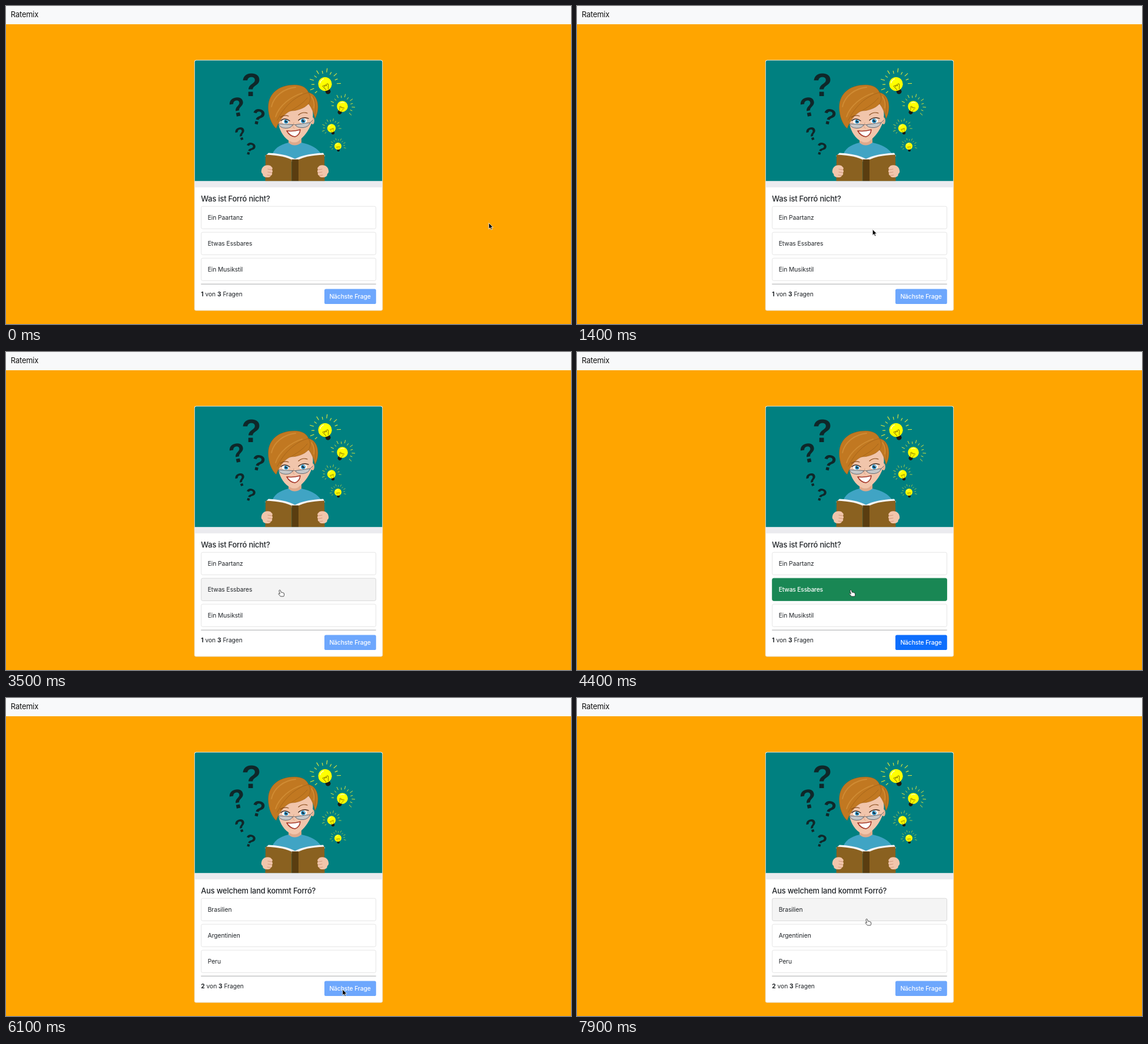
An HTML page that plays this animation: 960 by 540 pixels, repeating every 8 s.

```html
<!DOCTYPE html>
<html lang="de">
<head>
<meta charset="utf-8">
<title>Ratemix</title>
<style>
  html, body { margin: 0; width: 100%; height: 100%; overflow: hidden; background: #ffa500; }
  svg.stage { display: block; width: 960px; height: 540px; }
  text { font-family: Inter, Roboto, "Liberation Sans", sans-serif; font-size: 10.34px; letter-spacing: -.008em; fill: #212529; white-space: pre; }
  .large { font-size: 12.9px; letter-spacing: -.016em; }
  .brand { fill: #111; }
  .title { font-weight: 500; }
  .bold { font-weight: 700; }
  .mark { font: bold 55px "Liberation Sans", Arial, sans-serif; letter-spacing: 0; fill: #0f2729; text-anchor: middle; }
  .option rect { fill: #fff; stroke: #dfdfdf; stroke-width: .8; }
  .option.hover rect { fill: #f4f4f4; stroke: #d2d2d2; }
  .option.right rect { fill: #198754; stroke: #198754; }
  .option.right text { fill: #fff; font-weight: 500; letter-spacing: -.017em; }
  .button text { fill: #fff; font-weight: 450; letter-spacing: -.011em; }
  .line { fill: none; stroke-linecap: round; stroke-linejoin: round; }
</style>
</head>
<body>
<svg class="stage" viewBox="0 0 960 540">
  <defs>
    <g id="bulb">
      <path d="M-4 10L4 10L4.300 15Q3 18 0 18Q-3 18-4.300 15Z" fill="#1b1b14"/>
      <circle r="11.600" fill="#ff0"/>
      <path class="line" d="M-7-5Q-4-9 1-9" stroke="#ffffa8" stroke-width="1.600"/>
      <path class="line" d="M-2 10L-5 2Q-2 0-2 4Q0-1 1 4Q3-1 5 2L2 10" stroke="#7d6a00" stroke-width=".9"/>
      <g class="rays" stroke="#e6e83a" stroke-width="1.100"></g>
    </g>
    <clipPath id="top"><path d="M320.800 297.400V95Q320.800 92.500 323.200 92.500H636.800Q639.200 92.500 639.200 95V297.400Z"/></clipPath>
  </defs>

  <rect width="960" height="540" fill="#ffa500"/>
  <rect width="960" height="31" fill="#f8f9fa"/>
  <text class="large brand" x="8" y="19.300">Ratemix</text>

  <rect x="320.300" y="92" width="319.400" height="425" rx="2.600" fill="#fff" stroke="#e6e3dd" stroke-width=".9"/>

  <g clip-path="url(#top)">
    <rect x="320" y="92" width="320" height="206" fill="#008080"/>
    <g id="marks"></g>
    <g id="bulbs"></g>

    <!-- reader -->
    <ellipse cx="521" cy="195" rx="3" ry="6" fill="#e5b396"/>
    <path d="M480 220V239Q490 247 502 239V220Z" fill="#dfa98b"/>
    <path d="M451 258C453 243 464 236 480 232Q490 241 502 232C520 236 534 243 538 258L490 264Z" fill="#40a4c4"/>
    <path d="M462 182C461 200 465 212 473 222C480 230 489 234 496 230C507 222 516 210 520 196C523 185 522 165 512 158C495 150 468 158 462 182Z" fill="#f1c5ab"/>
    <path d="M459 208C450 200 444 182 446 166C449 146 466 134 490 134C503 134 511 139 514 147C525 149 530 160 530 171C530 179 528 186 525 191C523 181 519 172 514 166C509 172 497 178 484 178C475 181 465 192 459 208Z" fill="#c17821" stroke="#9a5d18" stroke-width=".5"/>
    <g class="line" stroke="#a4651a" stroke-width=".9">
      <path d="M514 147C503 149 478 160 461 194"/>
      <path d="M514 166C518 160 518 153 514 147"/>
      <path d="M512 156C503 167 493 172 484 178"/>
      <path d="M522 153Q528 166 525 183"/>
    </g>
    <g class="line" stroke="#d08c34" stroke-width="1.800">
      <path d="M492 138C472 140 455 153 451 171"/>
      <path d="M503 148C484 154 464 169 458 188"/>
      <path d="M519 154Q525 162 523 173"/>
    </g>
    <g fill="#fff">
      <ellipse cx="475" cy="196.500" rx="6" ry="4"/>
      <ellipse cx="505" cy="195" rx="6.500" ry="4.500"/>
    </g>
    <g fill="#2685b5"><circle cx="476" cy="196" r="3.500"/><circle cx="505" cy="195" r="3.800"/></g>
    <g fill="#0d1d2b"><circle cx="476" cy="196" r="1.600"/><circle cx="505" cy="195" r="1.700"/></g>
    <g fill="#fff"><circle cx="477.500" cy="194.500" r=".9"/><circle cx="506.500" cy="193.500" r="1"/></g>
    <g class="line" stroke="#2e1c14" stroke-width="1.300">
      <path d="M467 194.500Q474 188.500 482 195"/>
      <path d="M497 194Q505 187 514 191"/>
    </g>
    <g class="line" stroke="#8a4d1c" stroke-width="1.200">
      <path d="M466 189Q473 184 480 187"/>
      <path d="M497 185Q504 179 512 182"/>
    </g>
    <path class="line" d="M489 198Q485 206 490 207.500" stroke="#d39c81" stroke-width=".9"/>
    <g fill="#b9c8d2" fill-opacity=".75" stroke="#5a636b" stroke-width=".9">
      <path d="M463 200L487 201.500Q485 207.500 475 207.500Q465 207 463 200Z"/>
      <path d="M492 201.500L517 198Q514 205.500 505 206.500Q493 207 492 201.500Z"/>
      <path class="line" d="M487 202Q489 200 492 202M517 198L521 194"/>
    </g>
    <path d="M477 212Q489 213.500 500 210Q499 219.500 491 222Q482 221 477 212Z" fill="#fff" stroke="#a63a2b" stroke-width="1.600" stroke-linejoin="round"/>

    <!-- book -->
    <path d="M446 249.500Q475 251 491 259.500Q507 251 539 249.500L542 255L491 265L440 255Z" fill="#f5f5f5"/>
    <path d="M441 252.500Q470 253.500 485.500 261V298H440.500Z" fill="#8a6120"/>
    <path d="M541 252.500Q512 253.500 496.500 261V298H541.500Z" fill="#8a6120"/>
    <rect x="485.500" y="260.500" width="11.500" height="38" fill="#5a3d10"/>
    <g id="hand">
      <path d="M434 279Q435 272 442 270.500Q449 269.500 451 273Q454 275 452 278Q454 281 452 283Q453 287 450 288Q449 291.500 444 291Q436 291 436 285Q433 283 434 279Z" fill="#f1c5ab"/>
      <path class="line" d="M445 277L451.500 278M445 282L451.500 283M444 287L449.500 288" stroke="#c88e70" stroke-width=".8"/>
    </g>
    <use href="#hand" transform="matrix(-1 0 0 1 982 0)"/>
  </g>

  <rect x="320.800" y="297.400" width="318.400" height="10.500" fill="#ebebef"/>
  <text id="title" class="large title" x="331.300" y="331.500"></text>
  <g id="options"></g>
  <rect x="331.300" y="471.700" width="297.400" height="1" fill="#a9aaab"/>
  <text x="331.300" y="492.800"><tspan id="number" class="bold"></tspan> von <tspan class="bold">3</tspan> Fragen</text>
  <g id="button" class="button">
    <rect x="541" y="480.600" width="87.800" height="25.500" rx="2.700"/>
    <text x="549.400" y="497.200">Nächste Frage</text>
  </g>

  <g id="cursor">
    <path id="arrow" d="M-.7-.6V9.600L1.700 7.400L3.300 11L5 10.300L3.500 6.800H6.600Z" fill="#000" stroke="#fff" stroke-width=".8"/>
    <path id="pointer" d="M-1.600 .4Q-.3-.5 .4 1L1.300 4.200Q2.500 3.500 3 4.500Q4.300 3.900 4.800 5Q6.100 4.700 6.400 6L6.700 8Q6.700 9.500 5.800 11H.4Q-.9 9.300-2.700 7.600Q-3.600 6.400-2.500 6Q-1.600 5.800-.5 7L-2 2Q-2.200 .9-1.600 .4Z" fill="#fff" stroke="#222" stroke-width=".8" stroke-linejoin="round"/>
  </g>
</svg>
<script>
const LOOP = 8000, ANSWERED = 3600, ADVANCED = 5300;
const $ = id => document.getElementById(id);
const clamp = v => Math.max(0, Math.min(1, v));

const quiz = [
  { title: "Was ist Forró nicht?", answers: ["Ein Paartanz", "Etwas Essbares", "Ein Musikstil"] },
  { title: "Aus welchem land kommt Forró?", answers: ["Brasilien", "Argentinien", "Peru"] }
];

// time, x, y of the cursor tip
const path = [
  [0, 821, 369], [50, 821, 369], [900, 580, 394], [1400, 503, 380],
  [1600, 492, 368], [2000, 492, 368], [2500, 478, 449], [2600, 478, 449],
  [3400, 466, 404], [4600, 466, 404], [5100, 575, 497], [6050, 575, 497],
  [6600, 472, 432], [6750, 472, 432], [7150, 424, 420], [7600, 486, 410],
  [7900, 493, 375], [8000, 493, 375]
];

// x, y, size, turn
const marks = [[416.7, 133.3, 1, 0], [392.7, 170.5, .83, -12], [429, 187.5, .68, 13], [398.5, 216.5, .56, -18], [415.3, 242, .54, 18]];
const bulbs = [[542, 132.500, 1, -22], [571.500, 170.500, .8, 24], [553, 207.500, .62, -18], [564, 238, .52, -6]];

$("marks").innerHTML = marks.map(([x, y, s, a]) =>
  `<text class="mark" y="20" transform="translate(${x} ${y}) rotate(${a}) scale(${s})">?</text>`).join("");
$("bulbs").innerHTML = bulbs.map(([x, y, s, a]) =>
  `<use href="#bulb" transform="translate(${x} ${y}) rotate(${a}) scale(${s})"/>`).join("");

document.querySelector(".rays").innerHTML = Array.from({ length: 12 }, (_, i) =>
  `<path d="M${i % 2 ? 20 : 18} 0H${i % 2 ? 27 : 23}" transform="rotate(${-200 + i * 20})"/>`).join("");

$("options").innerHTML = [340.2, 384.2, 428.2].map(y =>
  `<g class="option"><rect x="331.700" y="${y}" width="296.800" height="38.200" rx="2.600"/><text x="342.700" y="${y + 23}"></text></g>`).join("");
const options = [...document.querySelectorAll(".option")];

function slope(i, k) {
  const a = path[i - 1], b = path[i], c = path[i + 1];
  if (!a || !c || a[k] === b[k] || b[k] === c[k]) return 0;
  return (c[k] - a[k]) / (c[0] - a[0]);
}

function cursorAt(t, k) {
  const i = Math.max(0, path.findIndex(p => p[0] > t) - 1);
  const a = path[i], b = path[i + 1], d = b[0] - a[0];
  const u = (t - a[0]) / d, v = 1 - u;
  return v * v * (1 + 2 * u) * a[k] + u * u * (3 - 2 * u) * b[k]
    + u * v * d * (v * slope(i, k) - u * slope(i + 1, k));
}

const inside = (x, y, l, t, r, b) => x > l && x < r && y > t && y < b;

function draw(t) {
  const x = cursorAt(t, 1), y = cursorAt(t, 2);
  const page = t < ADVANCED ? 0 : 1;
  const open = t >= ANSWERED && !page;
  const onButton = open && inside(x, y, 541, 481, 629, 506);
  let hand = onButton;

  $("title").textContent = quiz[page].title;
  $("number").textContent = page + 1;
  options.forEach((o, i) => {
    const top = 340 + 44 * i;
    const hover = inside(x, y, 331, top, 629, top + 38.7);
    hand = hand || hover;
    o.classList.toggle("hover", hover);
    o.classList.toggle("right", open && i === 1);
    o.lastChild.textContent = quiz[page].answers[i];
  });

  const shown = page ? 1 - clamp((t - ADVANCED) / 150) : clamp((t - ANSWERED) / 150);
  $("button").setAttribute("opacity", .6 + .4 * shown);
  $("button").firstElementChild.setAttribute("fill", onButton ? "#0b5ed7" : "#0d6efd");
  $("cursor").setAttribute("transform", `translate(${x} ${y})`);
  $("arrow").style.display = hand ? "none" : "";
  $("pointer").style.display = hand ? "" : "none";
}

const start = performance.now();
function tick() {
  draw((performance.now() - start) % LOOP);
  requestAnimationFrame(tick);
}
tick();
</script>
</body>
</html>
```
